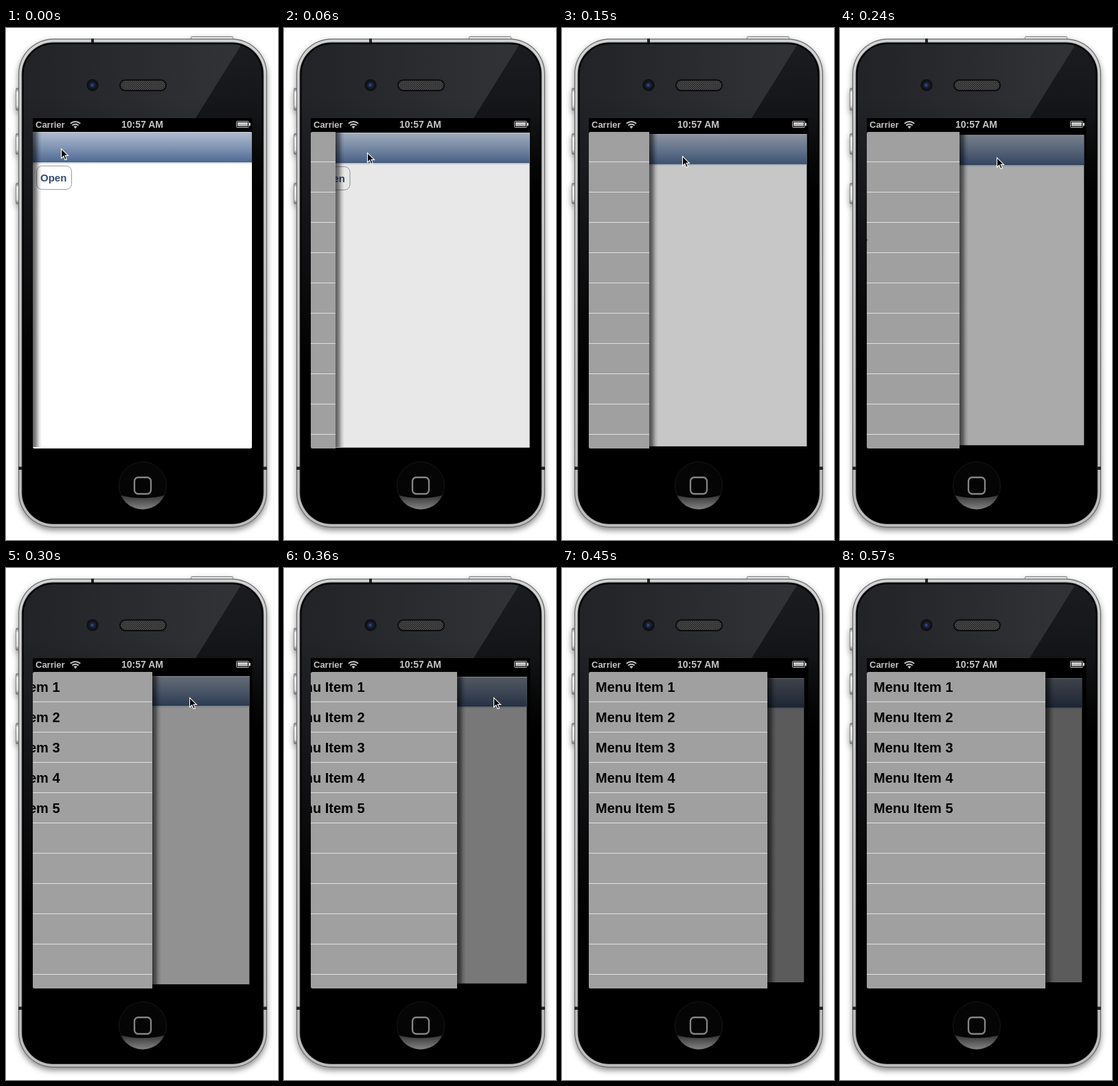
Recreate the animation shown at these times as an HTML page. Size 396x744 px, loop 3570 ms.

```html
<!DOCTYPE html>
<html lang="en">
<head>
<meta charset="utf-8">
<title>Sliding menu</title>
<style>
html, body { margin: 0; width: 100%; height: 100%; overflow: hidden; background: #fff; }
svg { display: block; width: 100%; height: 100%; }
text { font-family: "Liberation Sans", Arial, sans-serif; font-weight: bold; }
</style>
</head>
<body>
<svg viewBox="0 0 396 744">
  <defs>
    <linearGradient id="steel" x1="0" y1="0" x2="0" y2="1">
      <stop offset="0" stop-color="#d2d3d4"/><stop offset=".5" stop-color="#c9cacb"/><stop offset="1" stop-color="#bcbdbe"/>
    </linearGradient>
    <linearGradient id="key" x1="0" y1="0" x2="0" y2="1">
      <stop offset="0" stop-color="#777"/><stop offset=".2" stop-color="#eee"/><stop offset=".8" stop-color="#ddd"/><stop offset="1" stop-color="#666"/>
    </linearGradient>
    <linearGradient id="face" gradientUnits="userSpaceOnUse" x1="0" y1="22" x2="0" y2="240">
      <stop offset="0" stop-color="#1b1c1f"/><stop offset=".5" stop-color="#141517"/><stop offset="1" stop-color="#000"/>
    </linearGradient>
    <linearGradient id="glare" gradientUnits="userSpaceOnUse" x1="24" y1="0" x2="320" y2="0">
      <stop offset="0" stop-color="#222327"/><stop offset="1" stop-color="#303236"/>
    </linearGradient>
    <linearGradient id="fade" gradientUnits="userSpaceOnUse" x1="0" y1="100" x2="0" y2="500">
      <stop offset="0" stop-color="#000" stop-opacity="0"/><stop offset="1" stop-color="#000"/>
    </linearGradient>
    <linearGradient id="bar" x1="0" y1="0" x2="0" y2="1">
      <stop offset="0" stop-color="#b0bccf"/><stop offset=".5" stop-color="#8296b4"/><stop offset="1" stop-color="#4e6992"/>
    </linearGradient>
    <linearGradient id="under" x1="0" y1="0" x2="0" y2="1">
      <stop offset="0" stop-color="#9aa9c2" stop-opacity=".65"/><stop offset="1" stop-color="#9aa9c2" stop-opacity="0"/>
    </linearGradient>
    <linearGradient id="shade">
      <stop offset="0" stop-opacity=".62"/><stop offset=".35" stop-opacity=".45"/><stop offset=".7" stop-opacity=".13"/><stop offset="1" stop-opacity="0"/>
    </linearGradient>
    <linearGradient id="home" gradientUnits="userSpaceOnUse" x1="0" y1="678" x2="0" y2="700">
      <stop offset="0" stop-color="#303030"/><stop offset="1" stop-color="#858585"/>
    </linearGradient>
    <linearGradient id="cell" x1="0" y1="0" x2="0" y2="1">
      <stop offset="0" stop-color="#ddd"/><stop offset="1" stop-color="#999"/>
    </linearGradient>
    <pattern id="mesh" width="3" height="3" patternUnits="userSpaceOnUse">
      <rect width="3" height="3" fill="#1c1c1c"/>
      <circle cx=".8" cy=".8" r=".75" fill="#777"/><circle cx="2.3" cy="2.3" r=".75" fill="#666"/>
    </pattern>
    <filter id="drop" x="-10%" y="-10%" width="120%" height="120%">
      <feDropShadow dx="0" dy="4" stdDeviation="4" flood-opacity=".45"/>
    </filter>
    <clipPath id="body"><rect x="24" y="22" width="350" height="698" rx="45"/></clipPath>
    <clipPath id="window"><rect x="39" y="151" width="319" height="460" rx="2.5"/></clipPath>
    <clipPath id="disc"><circle cx="199" cy="665" r="34.5"/></clipPath>
  </defs>

  <g id="phone">
    <g filter="url(#drop)">
      <g fill="url(#key)" stroke="#777" stroke-width=".8">
        <rect x="14.5" y="87.5" width="6" height="32" rx="1.5"/>
        <rect x="14.5" y="153.5" width="6" height="30" rx="1.5"/>
        <rect x="14.5" y="225.5" width="6" height="30" rx="1.5"/>
        <rect x="269.5" y="12.5" width="61" height="6" rx="1"/>
      </g>
      <rect x="18" y="15.5" width="362" height="710.5" rx="51" fill="#666"/>
    </g>
    <rect x="19.2" y="16.7" width="359.6" height="708.1" rx="50" fill="url(#steel)"/>
    <rect x="22.6" y="20.6" width="352.8" height="700.4" rx="46.5" fill="#555"/>
    <path d="M18 637.500h6v4.500h-6zM374 637.500h6v4.500h-6zM124 15.500h4v6.500h-4z" fill="#222"/>
    <g clip-path="url(#body)">
      <rect x="24" y="22" width="350" height="698" fill="url(#face)"/>
      <path d="M24 22H344L276 131L24 535Z" fill="url(#glare)"/>
      <path d="M24 22H374V720H24Z" fill="url(#fade)"/>
    </g>
    <rect x="24.500" y="22.500" width="349" height="697" rx="44.500" fill="none" stroke="#000" stroke-width="2"/>

    <circle cx="126" cy="83" r="9.500" fill="#111215" stroke="#36373b" stroke-width=".7"/>
    <circle cx="126" cy="83" r="5" fill="#182139"/>
    <circle cx="125.500" cy="83" r="2.300" fill="#2a4480"/>
    <rect x="165" y="74.500" width="69" height="17.500" rx="8.700" fill="#0c0c0d"/>
    <rect x="167" y="76.500" width="65" height="13.500" rx="6.700" fill="url(#mesh)"/>

    <circle cx="199" cy="665" r="34.500" fill="#050505" stroke="#171717"/>
    <path clip-path="url(#disc)" d="M160 677Q199 689 238 677V704H160Z" fill="url(#home)"/>
    <rect x="187" y="653" width="24" height="24" rx="5.500" fill="none" stroke="#858585" stroke-width="2.300"/>
  </g>

  <rect x="39" y="131" width="319.500" height="480" fill="#000"/>
  <g fill="#c4c4c4">
    <text x="43" y="145" font-size="13">Carrier</text>
    <text x="168" y="145" font-size="14">10:57 AM</text>
    <path d="M101 146.200l-2.600-2.900q2.600-2 5.200 0z"/>
    <path d="M93.800 138.800q7.200-5.800 14.400 0M96.300 141.600q4.700-3.800 9.400 0" fill="none" stroke="#c4c4c4" stroke-width="1.900"/>
    <rect x="335.500" y="135.500" width="18" height="9" rx="1" fill="none" stroke="#c4c4c4"/>
    <rect x="337" y="137" width="15" height="6" fill="url(#cell)"/>
    <rect x="354" y="138" width="2" height="4"/>
  </g>

  <g clip-path="url(#window)">
    <g id="page">
      <rect x="38.500" y="151" width="320" height="460" fill="#fff"/>
      <rect x="38.500" y="195" width="320" height="3" fill="url(#under)"/>
      <rect x="38.500" y="151" width="320" height="44" fill="url(#bar)"/>
      <rect x="38.500" y="151" width="320" height="1" fill="#c9d1de"/>
      <rect x="38.500" y="194" width="320" height="1" fill="#405a84"/>
      <rect x="44.500" y="200.500" width="51" height="34" rx="8" fill="#fff" stroke="#9c9ca0"/>
      <text x="50" y="223" font-size="15" fill="#344a70">Open</text>
      <rect id="dim" x="38.500" y="151" width="320" height="460"/>
    </g>
    <g id="menu">
      <rect x="299" y="151" width="13" height="458" fill="url(#shade)"/>
      <rect x="39" y="151" width="260" height="460" fill="#a0a0a0"/>
    </g>
  </g>
  <path id="cursor" d="M.5.500V14.300L3.700 11.300 6 16.600 8.400 15.600 6.100 10.400H10.500Z" fill="#000" stroke="#fff" stroke-width="1.100"/>
</svg>
<script>
const LOOP = 3570, STEP = 30, RELEASE = 450, OPEN = 260;
const el = id => document.getElementById(id);
const [page, dim, menu, cursor] = ["page", "dim", "menu", "cursor"].map(el);

// Rows of [time, value]
const pull = [[0, 0], [90, 54], [150, 88], [240, 135], [360, 213], [420, 241], [RELEASE, OPEN]];
const handX = [[0, 80], [90, 141], [150, 175], [240, 228], [360, 305], [420, 346]];
const handY = [[0, 175], [90, 184], [150, 186], [240, 188]];

function at(keys, t) {
  const i = keys.findIndex(k => k[0] > t);
  if (i < 0) return keys[keys.length - 1][1];
  const [t0, a] = keys[i - 1], [t1, b] = keys[i];
  return a + (b - a) * (t - t0) / (t1 - t0);
}

function add(parent, tag, attrs, text = "") {
  const node = document.createElementNS("http://www.w3.org/2000/svg", tag);
  for (const k in attrs) node.setAttribute(k, attrs[k]);
  node.textContent = text;
  parent.append(node);
}

for (let i = 0; i < 10; i++) {
  const y = 194 + 44 * i;
  add(menu, "rect", { x: 39, y, width: 260, height: 1, fill: "#e0e0e0" });
  if (i < 5) add(menu, "text", { x: 49, y: y - 14, "font-size": 20 }, `Menu Item ${i + 1}`);
}

function draw(ms) {
  const t = Math.floor(ms % LOOP / STEP) * STEP;
  const x = Math.round(at(pull, t)), p = x / OPEN;
  menu.setAttribute("transform", `translate(${x - OPEN} 0)`);
  page.setAttribute("transform", `translate(198.5 381) scale(${1 - 0.04 * p}) translate(-198.5 -381)`);
  dim.setAttribute("opacity", 0.645 * p);
  cursor.setAttribute("transform", `translate(${Math.round(at(handX, t))} ${Math.round(at(handY, t))})`);
  cursor.setAttribute("visibility", t < RELEASE ? "visible" : "hidden");
}

const start = performance.now();
function tick() {
  draw(performance.now() - start);
  requestAnimationFrame(tick);
}
tick();
</script>
</body>
</html>
```
